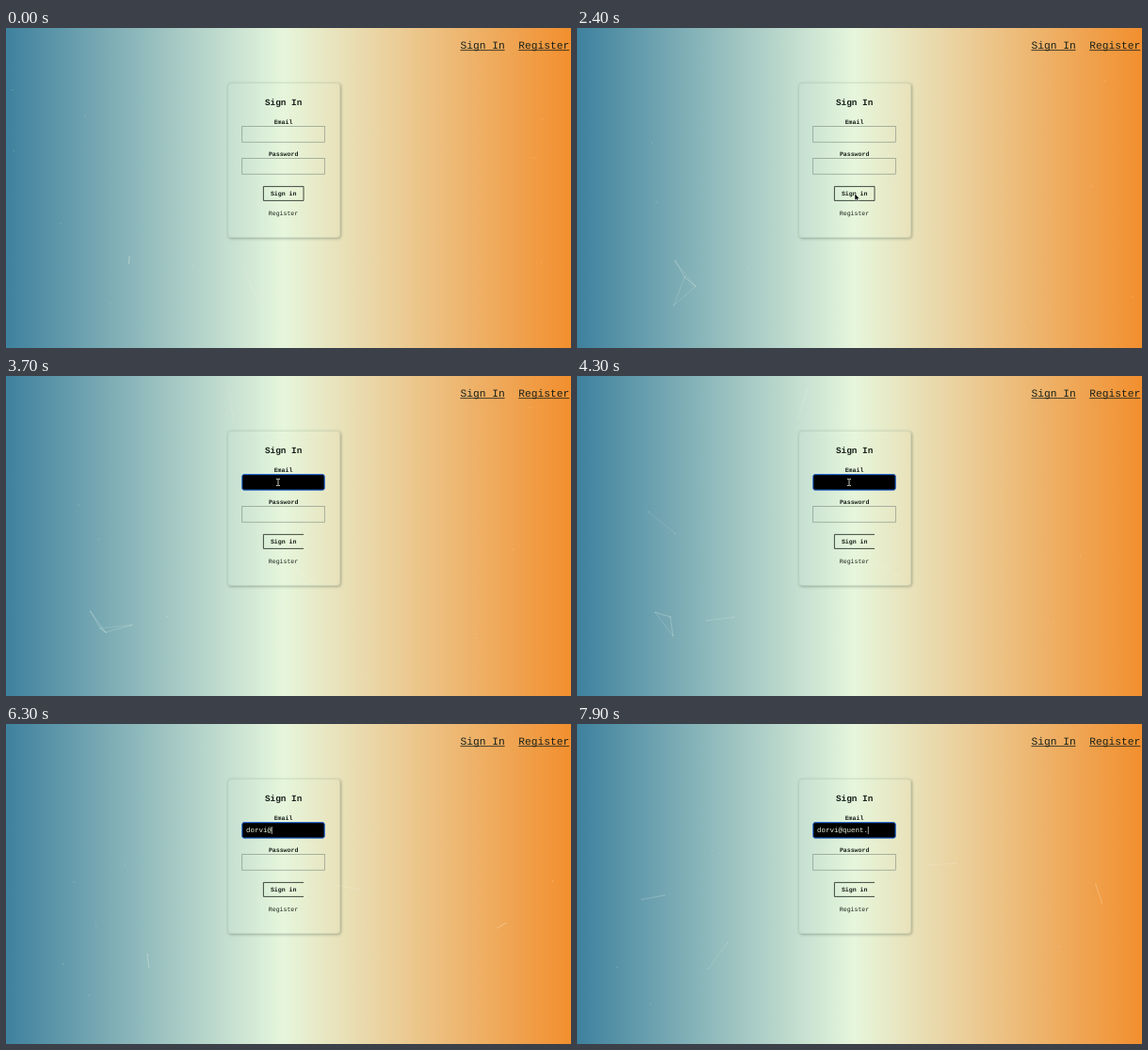
Animation of 600 by 340 pixels, one loop 8 s. Source, as an HTML page with a canvas:

```html
<!DOCTYPE html>
<html lang="en">
<head>
<meta charset="utf-8">
<title>Sign In</title>
<style>
  html, body { margin: 0; width: 100%; height: 100%; overflow: hidden; }
  body {
    position: relative;
    background: linear-gradient(to right, #3e819e 0, #e6f6dc 294px, #f28f2e 600px);
  }
  canvas, svg { position: absolute; left: 0; top: 0; width: 600px; height: 340px; display: block; }
  .card {
    position: absolute; left: 235px; top: 58px; width: 119.5px; height: 164.5px;
    box-sizing: border-box; border: 1px solid rgba(120, 150, 130, .2); border-radius: 4px;
    box-shadow: 1px 1px 3px rgba(40, 50, 40, .32);
  }
  text {
    font-family: "Courier New", Courier, "Liberation Mono", monospace;
    fill: #17201a; text-rendering: geometricPrecision; white-space: pre;
  }
  .mid { text-anchor: middle; font-size: 6.55px; }
  .bold { font-weight: bold; }
  .nav { font-size: 11.25px; }
  .line { fill: none; stroke: #17201a; stroke-width: .8; }
  .field { fill: none; stroke: #8b978a; stroke-width: .7; }
  .dark { fill: #000; stroke: none; }
  .ring { fill: none; stroke: #1c68e3; stroke-width: 1; }
</style>
</head>
<body>
<canvas id="net" width="600" height="340"></canvas>
<div class="card"></div>
<svg viewBox="0 0 600 340">
  <text class="nav" x="482.4" y="22">Sign In</text>
  <text class="nav" x="544.2" y="22">Register</text>
  <path class="line" d="M482.4 23.6H529.6M544.2 23.6H598.2"/>

  <text class="mid bold" x="294.6" y="82.2" style="font-size:9.4px">Sign In</text>
  <text class="mid bold" x="294.5" y="102">Email</text>
  <text class="mid bold" x="294.6" y="136">Password</text>
  <text class="mid bold" x="294.7" y="178.4">Sign in</text>
  <text class="mid" x="294.5" y="198.5">Register</text>

  <rect id="email" x="250.7" y="104.6" width="87.6" height="16.6"/>
  <rect id="pass" x="250.7" y="138.6" width="87.6" height="16.6"/>
  <rect class="ring" id="emailRing" x="250.8" y="104.7" width="87.4" height="16.4" rx="2"/>
  <text id="typed" x="255" y="115.4" style="font-size:7.5px;fill:#e6efd9"></text>
  <path id="caret" stroke="#e6efd9" stroke-width=".7"/>

  <path class="line" id="button"/>
  <rect class="ring" id="buttonRing" x="272.5" y="168.2" width="45" height="15.6" rx="1.8"/>

  <path id="arrow" d="M0 0V7.2L1.7 5.7L2.8 8.2L4 7.7L2.9 5.2H5.1Z" fill="#000" stroke="#fff" stroke-width=".5"/>
  <path id="beam" d="M-2 -3.5H-.6L0 -3L.6 -3.5H2M0 -3V3M-2 3.5H-.6L0 3L.6 3.5H2" fill="none" stroke="#d8dfd0" stroke-width=".9"/>
</svg>
<script>
const LOOP = 8000, STEP = 100, REACH = 38, W = 600, H = 340;
const $ = id => document.getElementById(id);
const ctx = $('net').getContext('2d');

let seed = 11;
const rand = () => (seed = seed * 16807 % 2147483647) / 2147483647;

function drifter() {
  const a = rand() * Math.PI * 2, v = 8 + rand() * 12;
  return [rand() * W, rand() * H, Math.cos(a) * v, Math.sin(a) * v];
}

// A few points that meet and link, then loose ones: x, y, velocity in px/s
const points = [
  [111, 293, 6.2, -7.7], [199, 252, -7.5, 1], [107, 344, -1.8, -20.5], [84, 94, -1.9, 11.7],
  [252, 255, 15.4, -13.3], [266, 287, 17.3, -17.6],
  [561, 138, -6.2, 12.5], [672, 76, -14.5, 14.4], [452, 374, 12.5, -25.8],
  ...Array.from({ length: 12 }, drifter)
];

// Pointer path: seconds, x, y
const path = [[1.3, 375, 304], [2.4, 295, 176], [2.8, 294, 174], [3.2, 291, 133], [3.5, 289, 113]];

const KEYS = 'dorvih<@quent.'; // '<' deletes
const keyTime = i => i < 6 ? 4.6 + i * .15 : 6.05 + (i - 6) * .25;

const ease = k => k * k * (3 - 2 * k);
const show = (id, on) => $(id).setAttribute('visibility', on ? 'visible' : 'hidden');

function pointerAt(t) {
  const i = path.findIndex(p => p[0] > t);
  if (i < 1) return path.at(i).slice(1);
  const [t0, x0, y0] = path[i - 1], [t1, x1, y1] = path[i];
  const k = ease((t - t0) / (t1 - t0));
  return [x0 + (x1 - x0) * k, y0 + (y1 - y0) * k];
}

function textAt(t) {
  return [...KEYS].filter((_, i) => keyTime(i) <= t)
    .reduce((s, c) => c === '<' ? s.slice(0, -1) : s + c, '');
}

function drawNet(t) {
  const now = points.map(([x, y, vx, vy]) => [x + vx * t, y + vy * t]);
  ctx.clearRect(0, 0, W, H);
  ctx.lineWidth = .8;
  ctx.fillStyle = 'rgba(255,255,240,.25)';
  now.forEach(([x, y], i) => {
    ctx.beginPath();
    ctx.arc(x, y, .7, 0, Math.PI * 2);
    ctx.fill();
    for (const [u, v] of now.slice(i + 1)) {
      const d = Math.hypot(u - x, v - y);
      if (d > REACH) continue;
      ctx.strokeStyle = `rgba(255,255,240,${.5 * (1 - d / 55)})`;
      ctx.beginPath();
      ctx.moveTo(x, y);
      ctx.lineTo(u, v);
      ctx.stroke();
    }
  });
}

function setField(id, dark, focus) {
  $(id).setAttribute('class', dark ? 'dark' : 'field');
  $(id).setAttribute('rx', focus ? 2 : 0);
}

function drawForm(t) {
  const emailOn = t >= 3.7;
  const buttonOn = t >= 2.5 && !emailOn;
  setField('email', t >= 3.4, emailOn);
  setField('pass', t >= 2.9 && t < 3.4, false);
  show('emailRing', emailOn);
  show('buttonRing', buttonOn);
  show('button', !buttonOn);
  // The right edge stays unpainted once focus has left the button
  $('button').setAttribute('d', 'M316 168.4H273.4V183.4H316' + (emailOn ? '' : 'Z'));

  const text = textAt(t);
  $('typed').textContent = text;
  $('caret').setAttribute('d', `M${255.3 + text.length * 4.5} 109V117`);
  show('caret', text.length > 0);

  const [x, y] = pointerAt(t);
  const seen = t >= 1.1 && t < 4.6;
  const inField = y < 121 || (y > 139 && y < 155);
  show('arrow', seen && !inField);
  show('beam', seen && inField);
  for (const id of ['arrow', 'beam']) $(id).setAttribute('transform', `translate(${x} ${y})`);
}

function frame() {
  const t = Math.floor(performance.now() % LOOP / STEP) * STEP / 1000;
  drawNet(t);
  drawForm(t);
  requestAnimationFrame(frame);
}
frame();
</script>
</body>
</html>
```
